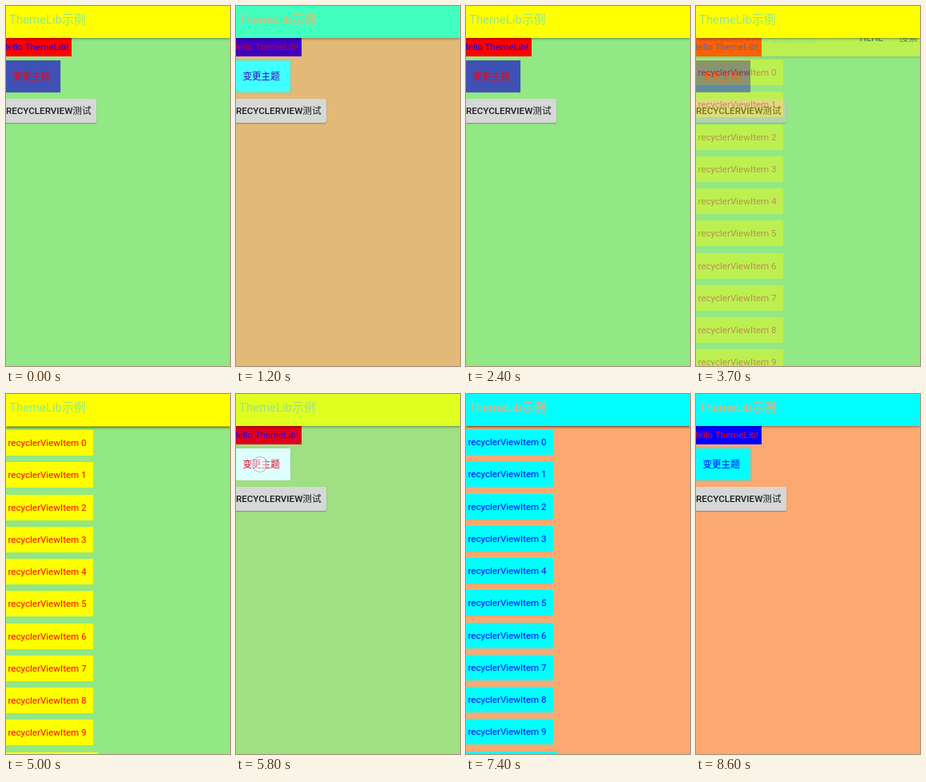
These frames come from a looping animation (280 px wide and 450 px high, 9100 ms). An HTML page:

```html
<!DOCTYPE html>
<html lang="zh">
<head>
<meta charset="utf-8">
<title>ThemeLib示例</title>
<style>
html, body { margin: 0; width: 100%; height: 100%; overflow: hidden; }
body {
  position: relative;
  font: 11.6px Roboto, "Noto Sans CJK SC", "Noto Sans CJK", sans-serif;
  white-space: nowrap;
}
.screen { position: absolute; inset: 0; background: var(--bg); overflow: hidden; }
.screen > *, .bar > *, .dot { position: absolute; }
#list { overflow: visible; }
.bar {
  left: 0; right: 0; top: -60px; height: 100px; z-index: 1;
  background: var(--bar);
  box-shadow: 0 1px 3px rgba(0, 0, 0, .4);
}
.bar > * { top: 67px; line-height: 20px; }
.title { left: 4px; font-size: 14.9px; color: var(--bg); }
.menu { font-weight: 500; color: #000; }
.hello {
  left: 0; top: 40px; width: 82px; height: 23px;
  line-height: 23px; overflow: hidden;
  background: var(--warm); color: var(--cool);
}
.hello span { margin-left: -5.7px; }
.btn { left: -4px; box-sizing: border-box; font-weight: 500; border-radius: 2px; }
#change {
  top: 68px; width: 72px; height: 39.5px; line-height: 40px;
  padding-left: 12.4px; border-radius: 0;
  background: var(--btn); color: var(--warm);
  box-shadow: 0 0 1px rgba(0, 0, 0, .25);
}
#open {
  top: 116px; width: 117px; height: 30px; line-height: 30px;
  padding-left: 4px; color: #1c1c1c;
  box-shadow: 0 1px 1.5px rgba(0, 0, 0, .3);
}
.item {
  left: 0; height: 32px; line-height: 32px; padding: 0 8.3px 0 2.5px;
  background: var(--bar); color: var(--warm);
}
.dot {
  width: 18px; height: 18px; margin: -10px; border-radius: 50%; z-index: 3;
  background: rgba(255, 255, 255, .45); border: 1px solid rgba(90, 90, 90, .4);
}
</style>
</head>
<body>
<div class="screen">
  <div class="bar"><span class="title">ThemeLib示例</span></div>
  <div class="hello"><span>Hello ThemeLib!</span></div>
  <div class="btn" id="change">变更主题</div>
  <div class="btn" id="open">RECYCLERVIEW测试</div>
</div>
<div class="screen" id="list">
  <div class="bar">
    <span class="title">RecyclerView主题测试</span>
    <span class="menu" style="left:204.5px">HEHE</span>
    <span class="menu" style="left:254px">搜索</span>
  </div>
</div>
<div class="dot" id="dot"></div>
<script>
const LOOP = 9100, STEP = 100, SLIDE = 36;
const $ = id => document.getElementById(id);
const list = $('list'), dot = $('dot'), openBtn = $('open');
const root = document.documentElement.style;

const GREEN = [146, 232, 132], ORANGE = [252, 169, 113];
const YELLOW = [255, 255, 0], CYAN = [0, 255, 255];
const RED = [255, 0, 0], BLUE = [0, 0, 255];
const INDIGO = [63, 81, 181], WHITE = [255, 255, 255];

// from, to, x, y
const taps = [
  [800, 1000, 30, 88],
  [1900, 2100, 30, 88],
  [3300, 3500, 28, 139.5],
  [5700, 5900, 30, 88],
  [6700, 6900, 39, 135.5]
];
// press, enter, leave
const visits = [[3500, 3670, 4958], [6900, 6970, 8358]];

for (let i = 0; i < 11; i++) {
  const el = document.createElement('div');
  el.className = 'item';
  el.style.top = 44 + i * 40.25 + 'px';
  el.textContent = 'recyclerViewItem ' + i;
  list.append(el);
}

const clamp = v => Math.max(0, Math.min(1, v));
const mix = (a, b, p) => `rgb(${a.map((v, i) => Math.round(v + (b[i] - v) * p))})`;
const fade = (t, from) => clamp((t - from) / 400);

function paintTheme(t) {
  const p = fade(t, 900) - fade(t, 1975) + fade(t, 5750);
  const reverse = t >= 1900 && t < 5700;
  const set = (name, a, b) => root.setProperty('--' + name, mix(a, b, p));
  set('bg', GREEN, ORANGE);
  set('bar', YELLOW, CYAN);
  set('warm', RED, BLUE);
  set('cool', BLUE, RED);
  set('btn', reverse || p === 0 ? INDIGO : WHITE, CYAN);
}

function paintList(t) {
  let y = 0, alpha = 0, pressed = false;
  for (const [press, enter, leave] of visits) {
    if (t >= press && t < enter + 350) pressed = true;
    if (t < enter || t >= leave + 240) continue;
    if (t < leave) {
      const e = t - enter;
      y = SLIDE * (1 - clamp(e / 350)) ** 5;
      alpha = 1 - (1 - clamp(e / 200)) ** 3;
    } else {
      const e = t - leave;
      y = SLIDE * (e / 250) ** 2;
      alpha = 1 - clamp((e - 100) / 150);
    }
  }
  list.style.transform = `translateY(${Math.round(y)}px)`;
  list.style.opacity = alpha;
  list.style.visibility = alpha ? 'visible' : 'hidden';
  openBtn.style.background = pressed ? '#c6c7c7' : '#d6d7d7';
}

function paintDot(t) {
  const tap = taps.find(([from, to]) => t >= from && t < to);
  dot.style.visibility = tap ? 'visible' : 'hidden';
  if (tap) {
    dot.style.left = tap[2] + 'px';
    dot.style.top = tap[3] + 'px';
  }
}

const start = performance.now();
function frame() {
  const now = (performance.now() - start) % LOOP;
  const t = Math.floor(now / STEP) * STEP;
  paintTheme(t);
  paintList(t);
  paintDot(t);
  requestAnimationFrame(frame);
}
frame();
</script>
</body>
</html>
```
